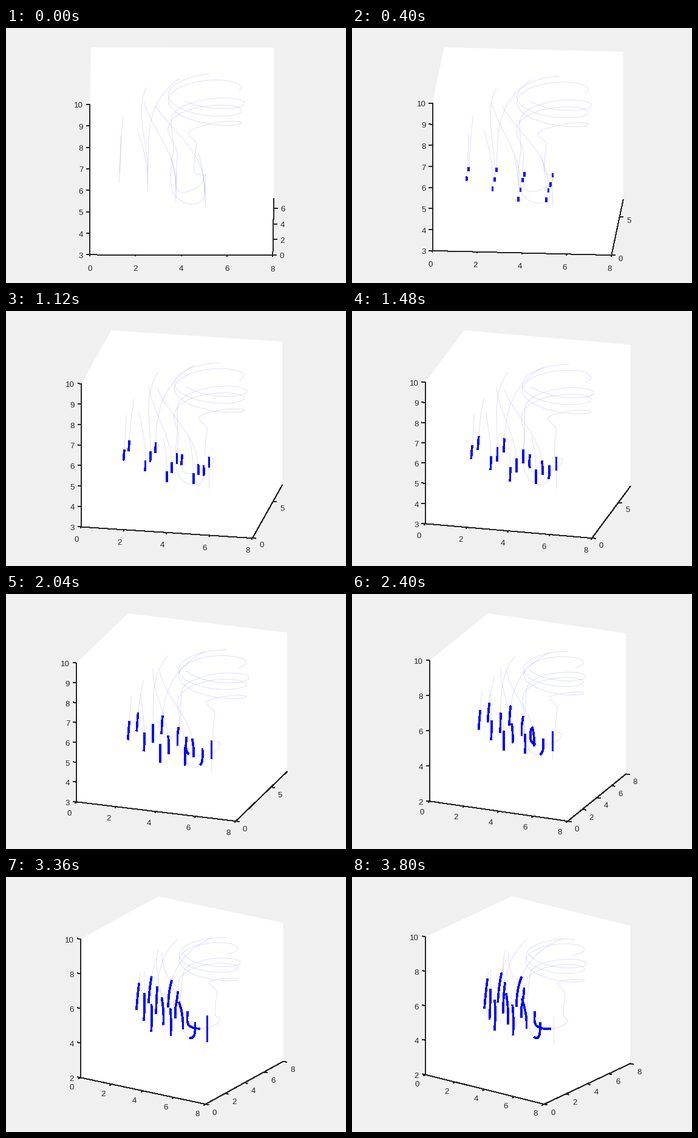
These frames come from a looping animation (560 px wide and 420 px high, 3.84 s). A matplotlib script:

```python
import numpy as np
import matplotlib.pyplot as plt
from matplotlib.animation import FuncAnimation

W, H, DPI = 560, 420, 100
PX = 72 / DPI        # points per pixel
FRAMES, INTERVAL = 96, 40
CX, CY, BOX_H = 289.7, 203.0, 342.3
ELEV = np.radians(20)
AZ_STEP = 0.375      # degrees per frame
SPEED = 0.018        # data units per frame
Y_GROWS, Z_GROWS = 54, 60
INK = "#262626"
EYE_X, EYE_Y, COIL_R = 5.0, 5.15, 1.6
GRID, Z_START = 1.25, 5


def turn(r, degrees, z, cx=EYE_X):
    """Points around the vortex axis, clockwise, angle 0 at the left."""
    a = np.radians(degrees)
    return np.column_stack([cx - r * np.cos(a), EYE_Y + r * np.sin(a), z])


def coil(start, end, z0, rise, bend=0.0, cx=EYE_X):
    t = np.linspace(0, 1, 16)
    return turn(COIL_R, start + (end - start) * t,
                z0 + rise * t + bend * t * t, cx)


def outer_line(r, angle):
    """Lines far from the axis climb first, then bend into the vortex."""
    sweep = max(4, 66 - 46 * (r - 2.5))
    rise = 3.58 - np.clip(1.35 * (r - 2.9), 0, 1.55)
    u = np.linspace(0, 1, 40)
    return turn(r * (1 - 0.04 * u), angle + sweep * u**2.5, Z_START + rise * u)


def captured_line(r, angle):
    """Climbs straight, then winds up at a steady rate."""
    z = np.linspace(Z_START, 8.98, 160)
    wound = 49 * np.logaddexp(0, (z - 6.92) / 0.2)
    shrink = np.clip((z - 5.6) / 1.5, 0, 1)
    return turn(r + (COIL_R - r) * shrink, angle + wound, z)


def scoop(a, b, z, depth):
    """U-shaped dip from ground point a to ground point b."""
    t = np.linspace(0, np.pi, 9)
    s = (1 - np.cos(t)) / 2
    return np.column_stack([a[0] + (b[0] - a[0]) * s,
                            a[1] + (b[1] - a[1]) * s,
                            z - depth * np.sin(t)])


def smooth(*parts, n=12):
    """Cubic Hermite curve through all the points."""
    p = np.vstack(parts).astype(float)
    t = arc(p)
    m = np.gradient(p, t, axis=0)
    u = np.linspace(0, 1, n, endpoint=False)[:, None]
    curve = []
    for i, h in enumerate(np.diff(t)):
        curve.append((2 * u**3 - 3 * u**2 + 1) * p[i]
                     + (u**3 - 2 * u**2 + u) * h * m[i]
                     + (3 * u**2 - 2 * u**3) * p[i + 1]
                     + (u**3 - u**2) * h * m[i + 1])
    return np.vstack(curve + [p[-1:]])


def arc(p):
    return np.r_[0, np.cumsum(np.linalg.norm(np.diff(p, axis=0), axis=1))]


def build_lines():
    lines = []
    for i in range(1, 5):
        for j in range(max(1, 4 - i), 5):
            x, y = GRID * i, GRID * j
            r = np.hypot(x - EYE_X, y - EYE_Y)
            angle = np.degrees(np.arctan2(y - EYE_Y, EYE_X - x))
            if r > 2.2:
                lines.append(outer_line(r, angle))
            elif (i, j) == (3, 3):
                lines.append(captured_line(r, angle))

    sink = np.array([(5, 5, Z_START), (5, 5, 3.43)])
    front = smooth([(5, 3.75, Z_START)],
                   scoop((5, 3.75), (3.52, 4.7), 4.55, 0.7),
                   [(3.5, 4.68, 5.1), (3.62, 4.55, 6.3)],
                   coil(0, 311, 7.42, 1.33, cx=5.14))
    back = smooth([(3.75, 5, Z_START)],
                  scoop((3.75, 5), (4.96, 6.35), 4.35, 0.43),
                  [(4.6, 6.54, 4.4), (4.55, 6.6, 5.2), (4.6, 6.6, 5.8),
                   (4.26, 6.39, 6.32)],
                  coil(100, 560, 6.68, 3.69, bend=-1.42))
    return lines + [sink, front, back]


LINES = build_lines()
LENGTHS = [arc(p) for p in LINES]


class View:
    """Orthographic camera fitted to the height of the plot area."""

    def __init__(self, k):
        self.az = (k + 1) * AZ_STEP
        a = np.radians(self.az)
        self.sin, self.cos = np.sin(a), np.cos(a)
        self.y1 = 8 if k >= Y_GROWS else 7.3
        self.z0 = 2 if k >= Z_GROWS else 3
        depth = 8 * self.sin + self.y1 * self.cos
        self.scale = BOX_H / (np.cos(ELEV) * (10 - self.z0)
                              + np.sin(ELEV) * depth)

    def __call__(self, points):
        p = np.asarray(points, float)
        x = p[..., 0] - 4
        y = p[..., 1] - self.y1 / 2
        z = p[..., 2] - (self.z0 + 10) / 2
        right = x * self.cos + y * self.sin
        up = np.cos(ELEV) * z + np.sin(ELEV) * (y * self.cos - x * self.sin)
        return np.stack([CX + self.scale * right, CY - self.scale * up], -1)


fig = plt.figure(figsize=(W / DPI, H / DPI), dpi=DPI, facecolor="#f0f0f0")
ax = fig.add_axes([0, 0, 1, 1])


def stroke(points, color, px, crisp=True, **kw):
    ax.plot(points[:, 0], points[:, 1], color=color, lw=px * PX,
            solid_capstyle="butt", antialiased=not crisp, **kw)


def tick(view, base, out, value, dx, dy, ha="center"):
    base = np.array(base, float)
    ends = view([base, base + np.array(out) * 6.2 / view.scale])
    stroke(ends, INK, 1)
    ax.text(ends[0, 0] + dx, ends[0, 1] + dy, str(value), color=INK,
            fontname="Liberation Sans", fontsize=13.33 * PX,
            ha=ha, va="center_baseline")


def draw_axes(view, k):
    y1, z0, az = view.y1, view.z0, view.az
    panes = view([(0, 0, z0), (0, 0, 10), (0, y1, 10),
                  (8, y1, 10), (8, y1, z0), (8, 0, z0)])
    ax.fill(panes[:, 0], panes[:, 1], color="white", lw=0)
    stroke(view([(0, 0, 10), (0, 0, z0), (8, 0, z0), (8, y1, z0)]), INK, 1)

    dx = -14 * np.sin(np.radians(min(3.2 * az, 90)))
    for x in range(0, 9, 2):
        tick(view, (x, 0, z0), (0, -1, 0), x, dx, 22 - 0.2 * az)

    y_step = 2 if k == 0 or k >= Y_GROWS else 5
    for y in range(0, int(y1) + 1, y_step):
        tick(view, (8, y, z0), (1, 0, 0), y, 15, 13 * (1 - np.exp(-az / 7)))

    for z in range(z0, 11, 2 if z0 == 2 else 1):
        tick(view, (0, 0, z), (-1, 0, 0), z, -11, 1, ha="right")


def draw(k):
    ax.cla()
    ax.set(xlim=(0, W), ylim=(H, 0))
    ax.axis("off")
    view = View(k)
    draw_axes(view, k)
    for line in LINES:
        stroke(view(line), "blue", 1, crisp=False, alpha=0.13)

    head = SPEED * k
    for line, s in zip(LINES, LENGTHS):
        if 0 < head <= s[-1]:
            t = np.linspace(0, head, 50)
            worm = np.column_stack([np.interp(t, s, c) for c in line.T])
            stroke(view(worm), "blue", 2.67)


anim = FuncAnimation(fig, draw, frames=FRAMES, interval=INTERVAL,
                     init_func=lambda: None, repeat=True, repeat_delay=0)
plt.show()
```
